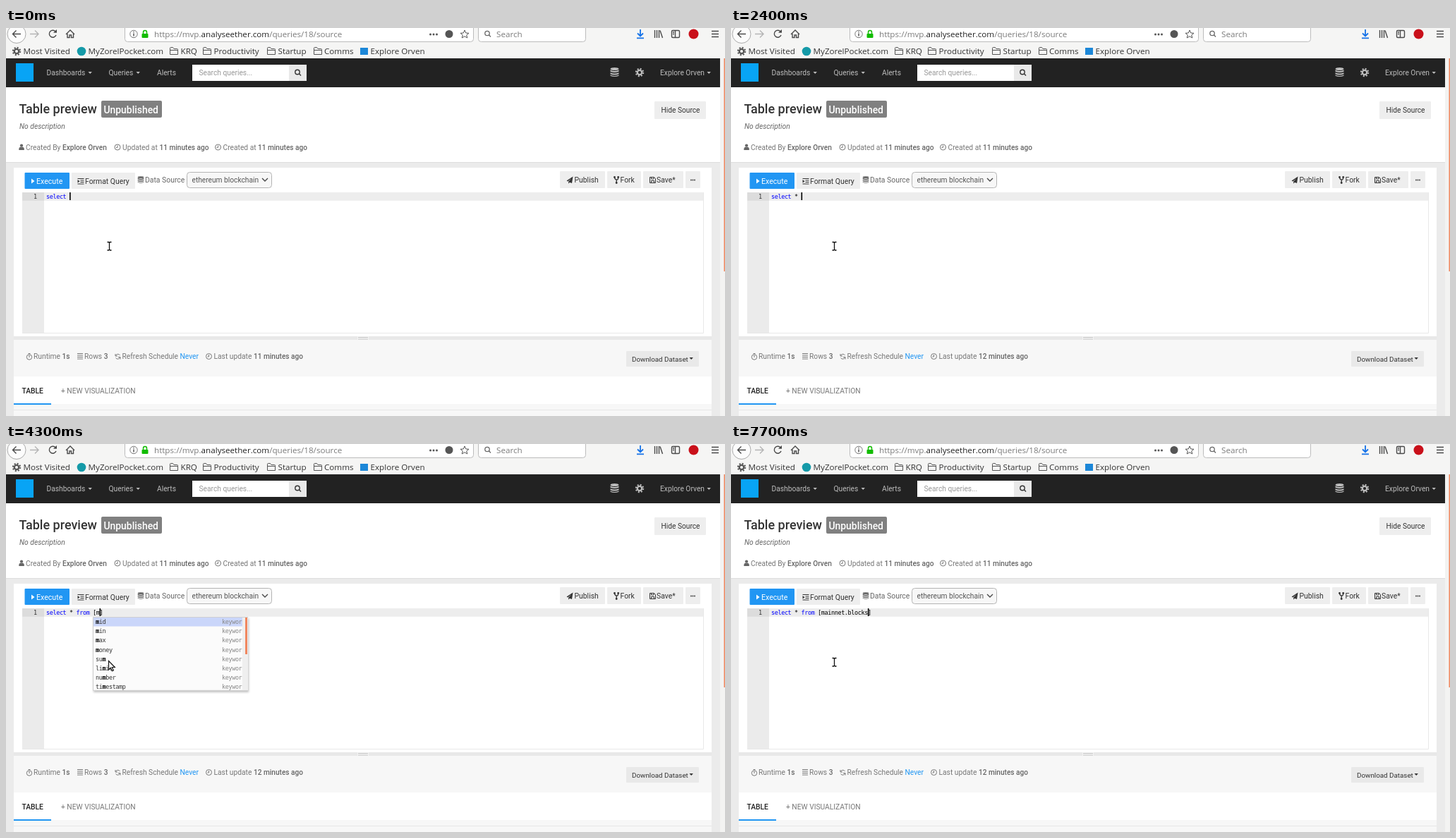
Animation, 1019 px wide and 550 px high, one loop 8000 ms. Source, as an HTML page:

```html
<!DOCTYPE html>
<html lang="en">
<head>
<meta charset="utf-8">
<title>Query editor</title>
<style>
html, body { margin: 0; width: 100%; height: 100%; overflow: hidden; background: #fff; }
svg { display: block; }
text { font: 10.25px Roboto, sans-serif; white-space: pre; }
.chrome text { font: 11.65px "Open Sans", sans-serif; fill: #333; }
.chrome .dim { fill: #7b7b7b; }
.nav text { fill: #bdbdbd; }
.meta text { fill: #777; }
.bold { font-weight: 500 !important; }
.meta .bold { fill: #666; font-size: 10.1px; }
.button rect { fill: #eee; }
.button text { fill: #333; font-size: 10.4px; }
.code text { font: 8.5px "DejaVu Sans Mono", monospace; letter-spacing: -.397px; fill: #000; }
.code .keyword { fill: #00f; }
.code .number { fill: #333; }
.popup text { fill: #333; }
.popup .kind { fill: #888; }
.popup .hit { font-weight: bold; fill: #000; }
.popup .panel { filter: drop-shadow(1px 2px 1.5px rgba(0,0,0,.25)); }
.line { fill: none; stroke: #4a4a4a; stroke-width: 1.4; }
.thin { stroke-width: 1; stroke: #777; }
</style>
</head>
<body>
<svg width="1019" height="550" viewBox="0 0 1019 550">
<defs>
  <g id="gear"><circle r="3.2" fill="none" stroke="currentColor" stroke-width="2.3"/><circle r="5.2" fill="none" stroke="currentColor" stroke-width="2" stroke-dasharray="2 2.084"/></g>
  <path id="folder" d="M.5 10.5V1.5Q.5 .5 1.5 .5H4.5L6 2.5H10.5Q11.5 2.5 11.5 3.5V10.5ZM.5 4.5H11.5" fill="none" stroke="#555"/>
  <path id="down" d="M0 0H5.4L2.7 3Z"/>
  <g id="lens" fill="none" stroke="currentColor"><circle r="3.2"/><path d="M2.3 2.3L5 5"/></g>
  <g id="clock" fill="none" stroke="#777"><circle r="4"/><path d="M0 -2.5V.4H-2"/></g>
  <g id="database"><ellipse rx="6" ry="2" cy="-4.5"/><path d="M-6 -3Q0 0 6 -3V-.8Q0 2 -6 -.8ZM-6 .7Q0 3.5 6 .7V2.7Q0 5.5 -6 2.7ZM-6 4.1Q0 7 6 4.1V5.2Q0 8 -6 5.2Z"/></g>
</defs>

<g class="chrome">
  <rect width="1019" height="43" fill="#f5f5f4"/>
  <circle cx="15" cy="8.5" r="13" fill="#fcfcfc" stroke="#aaa"/>
  <path class="line" d="M21 8.5H9.5M14.5 3.5L9.5 8.5L14.5 13.5"/>
  <path class="line" style="stroke:#b5b5b5" d="M34 8.5H46M41 3.5L46 8.5L41 13.5"/>
  <path class="line" d="M70.5 5.5A5 5 0 1 0 71 10"/><path d="M67 6.8H72V2Z" fill="#4a4a4a"/>
  <path class="line" d="M85 9L91 3L97 9M87 8V13.5H90V10H92.5V13.5H95.5V8"/>
  <path d="M168.5 -5V15.5Q168.5 19.5 172.5 19.5H658.5Q662.5 19.5 662.5 15.5V-5ZM669.5 -5V15.5Q669.5 19.5 673.5 19.5H817.5Q821.5 19.5 821.5 15.5V-5Z" fill="#fff" stroke="#bcbcbc"/>
  <circle class="line thin" cx="181" cy="8.5" r="5.2"/><path class="line" d="M181 7.5V11.5M181 5V6.3"/>
  <rect x="192.500" y="8" width="9" height="6" rx="1" fill="#12bc00"/><path d="M194.500 8V6A2.5 2.5 0 0 1 199.500 6V8" fill="none" stroke="#12bc00" stroke-width="1.5"/>
  <text x="210" y="12.500" class="dim">https://mvp.<tspan fill="#222">analyseether.com</tspan>/queries/18/source</text>
  <g fill="#555"><circle cx="601.500" cy="9" r="1.500"/><circle cx="606" cy="9" r="1.500"/><circle cx="610.500" cy="9" r="1.500"/><circle cx="628" cy="8.500" r="5.500"/></g>
  <path class="line thin" style="stroke:#555" d="M650 3L651.700 7L656 7.300L652.700 10L653.800 14L650 11.800L646.200 14L647.300 10L644 7.300L648.300 7Z"/>
  <use href="#lens" x="682" y="7.500" color="#666" stroke-width="1.300"/>
  <text x="695" y="13" class="dim">Search</text>
  <path d="M899 2V11M895 7.500L899 11.500L903 7.500M894 14.300H904" fill="none" stroke="#1572e8" stroke-width="1.800"/>
  <path class="line" d="M919.500 3V14M922.500 3V14M925.500 3V14M927 3.500L930.500 14"/>
  <rect class="line" x="943.500" y="3.500" width="11" height="10" rx="1.500"/><path class="line" d="M948.500 3.500V13.500M945 6H947M945 8.500H947"/>
  <circle cx="974.500" cy="8.500" r="7" fill="#c9101a"/>
  <path class="line" d="M1000 4.500H1010M1000 8.500H1010M1000 12.500H1010"/>
  <use href="#gear" x="15" y="33" color="#555"/>
  <circle cx="107" cy="33" r="6.300" fill="#159aa8"/>
  <use href="#folder" x="232" y="27"/><use href="#folder" x="279" y="27"/><use href="#folder" x="370" y="27"/><use href="#folder" x="436" y="27"/>
  <rect x="502" y="28" width="11" height="10" fill="#1c87d8"/>
  <text x="24.500" y="37">Most Visited</text><text x="116.500" y="37">MyZorelPocket.com</text><text x="247.500" y="37">KRQ</text>
  <text x="294.500" y="37">Productivity</text><text x="385.500" y="37">Startup</text><text x="451" y="37">Comms</text><text x="516.500" y="37">Explore Orven</text>
</g>

<g class="nav">
  <rect y="43" width="1012" height="41" fill="#222"/>
  <rect x="14" y="50" width="25" height="26" fill="#08a4f5"/>
  <text x="57.500" y="67">Dashboards</text><text x="145.500" y="67">Queries</text><text x="214" y="67">Alerts</text>
  <g fill="#bdbdbd"><use href="#down" x="116.500" y="62"/><use href="#down" x="184.500" y="62"/><use href="#down" x="993.500" y="62"/><use href="#database" x="862.500" y="62.500"/></g>
  <rect x="264" y="52" width="137" height="23" fill="#fff"/><rect x="401" y="52" width="25" height="23" fill="#e9e9e9"/>
  <text x="273.500" y="67" style="fill:#999">Search queries...</text>
  <use href="#lens" x="413" y="62.500" color="#333" stroke-width="1.400"/>
  <use href="#gear" x="898" y="63" color="#bdbdbd"/>
  <text x="927" y="67">Explore Orven</text>
</g>

<rect y="84" width="1012" height="466" fill="#ebebeb"/>
<rect y="84" width="1012" height="106" fill="#fff"/><rect y="190" width="1012" height="1" fill="#dedede"/>
<text x="18.500" y="121" class="bold" style="font-size:18px" fill="#333">Table preview</text>
<rect x="135" y="103" width="86" height="24" rx="2" fill="#808080"/>
<text x="138.500" y="121" class="bold" style="font-size:13.900px" fill="#fff">Unpublished</text>
<text x="19" y="143" style="font-style:italic" fill="#666">No description</text>
<g class="button">
  <rect x="919" y="104" width="73" height="25" rx="1"/><text x="928.500" y="120" style="font-size:10.200px">Hide Source</text>
</g>
<g class="meta">
  <circle cx="22" cy="166.500" r="2.100" fill="#666"/><path d="M18.300 173V171Q18.500 169 20.500 168.500H23.500Q25.500 169 25.800 171V173Z" fill="#666"/>
  <text x="28" y="173">Created By</text><text x="80" y="173" class="bold">Explore Orven</text>
  <use href="#clock" x="158" y="169"/><text x="165" y="173">Updated at</text><text x="217.500" y="173" class="bold">11 minutes ago</text>
  <use href="#clock" x="300.500" y="169"/><text x="307.500" y="173">Created at</text><text x="357" y="173" class="bold">11 minutes ago</text>
</g>

<rect x="11" y="198" width="989" height="239" fill="#fff"/>
<g class="button">
  <rect x="26.500" y="205" width="63.500" height="23" rx="1" style="fill:#2196f3"/>
  <path d="M36 213.500V220.500L40.500 217Z" fill="#fff"/><text x="43" y="220.500" style="fill:#fff;font-size:10.600px">Execute</text>
  <rect x="93" y="205" width="90" height="23" rx="1"/>
  <path d="M101.500 213.500H110.500M105.500 216H110.500M105.500 218.500H110.500M101.500 221H110.500" stroke="#333" stroke-width="1.200"/><path d="M101.500 215L104.500 217.200L101.500 219.500Z" fill="#333"/>
  <text x="112" y="220.500">Format Query</text>
  <use href="#database" transform="translate(191 215) scale(.72)" fill="#666"/><text x="197" y="219" style="fill:#666">Data Source</text>
  <rect x="256.500" y="204.500" width="120" height="22" rx="4" style="fill:#f7f7f7;stroke:#b4b4b4"/>
  <text x="263.500" y="219" style="fill:#555;font-size:10.200px">ethereum blockchain</text><path class="line" d="M363 213L367 217L371 213"/>
  <rect x="785" y="203" width="64" height="24" rx="1"/><path d="M794.500 216.500L803.500 210.500L802 220L798.800 218.700L797.200 220.700V217.800L801.500 213L796.300 217.400Z" fill="#333"/><text x="805.500" y="219">Publish</text>
  <rect x="852" y="203" width="48" height="24" rx="1"/><path d="M862.500 211.500Q862.500 214.500 865.200 215T867.500 211.500M865.200 215V219.500" fill="none" stroke="#333" stroke-width="1.300"/><g fill="#333"><circle cx="862.500" cy="211.500" r="1.400"/><circle cx="867.700" cy="211.500" r="1.400"/><circle cx="865.200" cy="219.500" r="1.400"/></g><text x="870.500" y="219">Fork</text>
  <rect x="903" y="203" width="57" height="24" rx="1"/><path d="M912.500 211.500H918.500L920.500 213.500V219.500H912.500ZM914.500 211.500V214H918V211.500M914.500 219.500V216.500H918.500V219.500" fill="none" stroke="#333"/><text x="922" y="219">Save*</text>
  <rect x="963" y="203" width="21" height="24" rx="1"/><g fill="#333"><circle cx="971" cy="215.500" r=".9"/><circle cx="973.500" cy="215.500" r=".9"/><circle cx="976" cy="215.500" r=".9"/></g>
</g>

<g class="code">
  <path d="M23 432.500H988.500V233" fill="none" stroke="#e8e8e8"/>
  <rect x="23" y="233" width="31" height="199" fill="#ebebeb"/>
  <rect x="23" y="233" width="31" height="11.700" fill="#dcdcdc"/><rect x="54" y="233" width="934" height="11.700" fill="#ededed"/>
  <text x="39" y="241.800" class="number">1</text>
  <text id="query" x="57" y="241.800"></text>
  <rect id="caret" y="233" width="1.600" height="11"/>
  <g id="popup" class="popup"></g>
</g>
<g id="beam" fill="none"><path d="M143 303.500H145.500L146.500 304.500L147.500 303.500H150M146.500 304.500V314M143 315H145.500L146.500 314L147.500 315H150" stroke="#fff" stroke-width="3"/><path d="M143.500 303.500H145.500L146.500 304.500L147.500 303.500H149.500M146.500 304.500V314M143.500 315H145.500L146.500 314L147.500 315H149.500" stroke="#111" stroke-width="1.300"/></g>
<path id="arrow" d="M145.500 307.500V320L148.300 317.300L150.300 321.800L152.300 321L150.300 316.500H154.300Z" fill="#fff" stroke="#111" stroke-width="1.200"/>

<rect x="11" y="437" width="989" height="5" fill="#e8e8e8"/>
<rect x="498" y="437" width="16" height="5" fill="#f4f4f4"/><path d="M499 438.500H513M499 441H513" stroke="#c4c4c4"/>
<rect x="11" y="442" width="989" height="108" fill="#f7f7f7"/>
<rect x="11" y="494" width="989" height="39" fill="#fff"/>
<g class="meta">
  <circle class="line thin" cx="33" cy="466.500" r="3.700"/><path class="line thin" d="M33 464V467M31.500 461.500H34.500"/>
  <text x="39" y="469">Runtime <tspan class="bold">1s</tspan></text>
  <path class="line thin" d="M101 461.500H109M101 464H109M101 466.500H109M101 469H109"/><text x="111" y="469">Rows <tspan class="bold">3</tspan></text>
  <path class="line thin" d="M155.500 464.500A3.300 3.300 0 0 1 161.500 464M161.500 467A3.300 3.300 0 0 1 155.500 467.500M155 462V465H158M162 469.500V466.500H159"/>
  <text x="164.500" y="469">Refresh Schedule</text><text x="246.500" y="469" style="fill:#2196f3">Never</text>
  <use href="#clock" x="287.500" y="465.500"/><text x="294.500" y="469">Last update</text><text id="updated" x="351" y="469" class="bold"></text>
</g>
<g class="button"><rect x="879" y="458" width="103" height="22" rx="1" style="fill:#e9e9e9"/><text x="887" y="472.500" style="font-size:9.800px">Download Dataset</text><use href="#down" x="968.500" y="467" fill="#333"/></g>
<text x="22.500" y="518" class="bold" fill="#222">TABLE</text><text x="78" y="518" fill="#777">+ NEW VISUALIZATION</text>
<rect x="11" y="532" width="53" height="2" fill="#2196f3"/>
<rect x="11" y="541" width="989" height="1" fill="#e6e6e6"/>
<rect x="1012" y="43" width="7" height="507" fill="#f3f3f2"/><rect x="1017.500" y="43" width="1.500" height="302" fill="#f0875f"/>
</svg>

<script>
const LOOP = 8000, CHAR = 4.72, LEFT = 57, ROW = 13.2, TOP = 246, MAX_HEIGHT = 104;
const get = id => document.getElementById(id);

// Completion lists by typed prefix; a scrolling list has more entries than fit.
const lists = {
  a: { words: 'avg asc as and rank max last database', scroll: true },
  as: { words: 'asc as last case lcase ucase database false', scroll: true },
  f: { words: 'format first foreign from false float ifnull if', scroll: true },
  fro: { words: 'from' },
  m: { words: 'mid min max money sum limit number timestamp', scroll: true },
  ma: { words: 'max format primary timestamp decimal' },
  b: { words: 'by binary bit bigint table number double database' },
  bl: { words: 'table double' }
};

// [start, text before the caret, completed prefix, caret hidden]
const steps = [
  [0, 'select '], [500, 'select *'], [800, 'select * '],
  [900, 'select * a', 'a'], [1000, 'select * as', 'as'], [1200, 'select * as '],
  [1800, 'select * as ', '', true], [1900, 'select * as'], [2000, 'select * a'], [2100, 'select * '],
  [2600, 'select * ', '', true], [2800, 'select * f', 'f'], [2900, 'select * fro', 'fro'],
  [3200, 'select * from'], [3300, 'select * from '], [3900, 'select * from ', '', true],
  [4100, 'select * from ['], [4300, 'select * from [m', 'm'], [4400, 'select * from [ma', 'ma'],
  [4600, 'select * from [mai'], [4800, 'select * from [main'], [4900, 'select * from [mainn'],
  [5000, 'select * from [mainne'], [5100, 'select * from [mainnet'], [5300, 'select * from [mainnet.'],
  [5900, 'select * from [mainnet.', '', true], [6300, 'select * from [mainnet.'],
  [6800, 'select * from [mainnet.b', 'b'], [6900, 'select * from [mainnet.bl', 'bl'],
  [7100, 'select * from [mainnet.blo'], [7300, 'select * from [mainnet.bloc'],
  [7600, 'select * from [mainnet.block'], [7700, 'select * from [mainnet.blocks']
];

function highlight(word, prefix) {
  let next = word.includes(prefix) ? word.indexOf(prefix) : 0, found = 0;
  return [...word].map((letter, i) => {
    if (i < next || letter !== prefix[found]) return letter;
    found++;
    return `<tspan class="hit">${letter}</tspan>`;
  }).join('');
}

function popupMarkup(prefix, column) {
  const { words, scroll } = lists[prefix];
  const rows = words.split(' ');
  const x = Math.round(LEFT + column * CHAR - 3.7);
  const height = Math.min(rows.length * ROW, MAX_HEIGHT);
  const kind = scroll ? 'keywor' : 'keyword';
  const items = rows.map((word, i) => {
    const y = TOP + 9 + i * ROW;
    return `<text x="${x + 3}" y="${y}">${highlight(word, prefix)}</text><text class="kind" x="${x + 182}" y="${y}">${kind}</text>`;
  }).join('');
  const bar = scroll
    ? `<rect x="${x + 211}" y="${TOP}" width="8" height="${height - 1}" fill="#efefef"/><rect x="${x + 215}" y="${TOP}" width="3" height="52" fill="#f0875f"/>`
    : '';
  return {
    covers: x < 146 && TOP + height > 309,
    markup: `<rect class="panel" x="${x - .5}" y="${TOP - .5}" width="219" height="${height - .2}" fill="#fbfbfb" stroke="#d0d0d0"/>
      <rect x="${x}" y="${TOP}" width="${scroll ? 211 : 218}" height="12.500" fill="#cad6fa"/>${items}${bar}`
  };
}

function render([, text, prefix, hidden]) {
  const full = text + (text.includes('[') ? ']' : '');
  get('query').innerHTML = full.replace(/\b(select|from|as)\b/g, '<tspan class="keyword">$1</tspan>');
  get('caret').setAttribute('x', LEFT + text.length * CHAR);
  get('caret').style.display = hidden ? 'none' : '';
  const popup = prefix ? popupMarkup(prefix, text.length - prefix.length) : { markup: '', covers: false };
  get('popup').innerHTML = popup.markup;
  get('arrow').style.display = popup.covers ? '' : 'none';
  get('beam').style.display = popup.covers ? 'none' : '';
}

let shown;
function tick() {
  const time = performance.now() % LOOP;
  const step = steps.findLast(([start]) => start <= time);
  if (step !== shown) render(shown = step);
  get('updated').textContent = `${time < 1300 ? 11 : 12} minutes ago`;
  requestAnimationFrame(tick);
}
tick();
</script>
</body>
</html>
```
